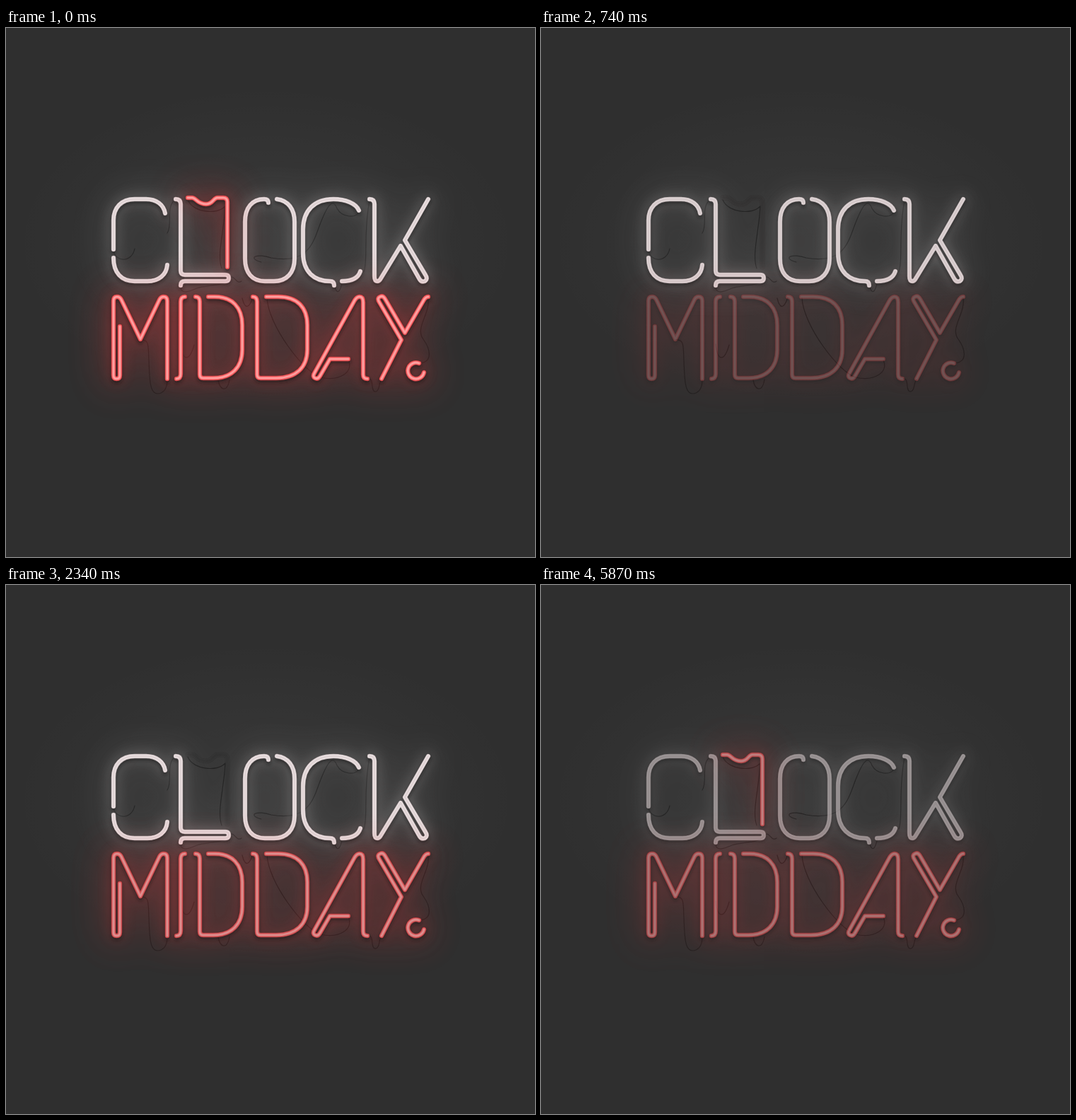
An HTML page for the animation above (5900 ms loop, 748 px wide and 748 px high).

```html
<!DOCTYPE html>
<html lang="en">
<head>
<meta charset="utf-8">
<title>Clock Midday</title>
<style>
  html, body { margin: 0; width: 100%; height: 100%; overflow: hidden; background: #2f2f2f; }
  svg { display: block; width: 100vw; height: 100vh; }
  path { fill: none; stroke-linecap: round; stroke-linejoin: round; }
</style>
</head>
<body>
<svg id="sign" viewBox="0 0 748 748" role="img" aria-label="CLOCK MIDDAY.">
  <defs>
    <radialGradient id="wall">
      <stop offset="0" stop-color="#fff" stop-opacity=".045"/>
      <stop offset=".5" stop-color="#fff" stop-opacity=".026"/>
      <stop offset="1" stop-color="#fff" stop-opacity="0"/>
    </radialGradient>
    <filter id="soft" filterUnits="userSpaceOnUse" x="0" y="0" width="748" height="748"><feGaussianBlur stdDeviation="2"/></filter>
    <filter id="near" filterUnits="userSpaceOnUse" x="0" y="0" width="748" height="748"><feGaussianBlur stdDeviation="9"/></filter>
    <filter id="far" filterUnits="userSpaceOnUse" x="0" y="0" width="748" height="748"><feGaussianBlur stdDeviation="26"/></filter>
  </defs>
  <ellipse cx="368" cy="305" rx="358" ry="225" fill="url(#wall)"/>
</svg>
<script>
const LOOP = 5900;
const sign = document.getElementById('sign');

const top5 = [
  // C
  'M225 262C223 250 213 242 198 242H182C163 242 152 254 152 272V313',
  'M152 325C152 346 163 358 182 358H200C216 358 227 349 228 335',
  // L
  'M240 242q7 0 7 7V343q0 6 6 6H310q5 0 5 4.5t-5 4.5H253q-6 0 -6 6',
  // O
  'M383 242C399 244 408 256 408 274V326C408 346 397 358 379 358H366C348 358 338 346 338 326V274C338 254 348 242 365 242q6 0 6 5',
  // C
  'M499 258C495 248 480 242 463 242C436 242 420 258 420 285V318C420 345 436 358 458 358q6 0 6 6',
  'M475 358C488 358 498 354 501 344',
  // K
  'M514 242q7 0 7 7V351q0 7 4 7q3 0 5 -4L558 308L584 354q3 6 8 4q5 -3 1 -9L564 300L597 242'
].join('');

const low6 = [
  // M
  'M161 422V491q0 5 -4.5 5t-4.5 -5V386q0 -6 5 -6q4 0 6 4L190 440L217 384q2 -4 6 -4q5 0 5 6V496',
  // I
  'M253 380q-6 0 -6 7V489q0 7 -6 7',
  // D
  'M268 380q6 0 6 7V490q0 5 5 5H293C319 495 334 480 334 455V420C334 395 320 380 295 380H286',
  // D
  'M349 380q6 0 6 7V490q0 5 5 5H382C410 495 426 480 426 455V420C426 395 412 380 385 380H368',
  // A
  'M511 496q-6 0 -6 -6V388q0 -8 -5 -8q-4 0 -7 5L436 488q-3 5 1 7q4 2 7 -3L458 468H484',
  // Y
  'M531 496L559 441L528 388q-4 -6 1 -8q4 -2 7 3L564 431L590 386q3 -6 7 -6',
  // point
  'M584 474A11.5 11.5 0 1 0 591 487'
].join('');

const tag = 'M257 240H263C269 240 270 249 283 249C293 249 293 240 299 240H307q6 0 6 6V338';

const cables = [
  'M151 313C155 332 178 332 182 312',
  'M240 243C225 250 236 280 228 290',
  'M257 243C265 262 300 264 310 252C308 290 298 320 305 340',
  'M247 364C246 378 258 373 270 368S310 365 316 355S325 364 333 358',
  'M361 331C340 325 355 318 375 325C430 335 435 300 445 275C455 250 462 240 468 255C475 268 495 270 500 259',
  'M464 364q6 20 12 -6',
  'M514 244C505 290 512 330 506 345',
  'M190 441C203 440 201 450 202 470C203 500 204 517 214 517C224 517 228 508 228 498',
  'M247 447C250 474 260 470 266 448',
  'M300 497C302 513 313 516 316 497',
  'M334 382C338 399 344 396 349 381',
  'M369 382C371 420 420 486 445 494C472 500 492 486 484 470',
  'M512 496C521 494 515 514 522 514C529 514 527 500 531 497',
  'M597 382C600 404 578 424 590 440C600 454 604 472 585 474'
].join('');

function add(parent, name, attrs) {
  const el = document.createElementNS('http://www.w3.org/2000/svg', name);
  for (const key in attrs) el.setAttribute(key, attrs[key]);
  return parent.appendChild(el);
}

function line(parent, d, stroke, width, opacity = 1, filter, dy = 0) {
  const attrs = { d, stroke, 'stroke-width': width, opacity };
  if (filter) attrs.filter = `url(#${filter})`;
  if (dy) attrs.transform = `translate(0 ${dy})`;
  return add(parent, 'path', attrs);
}

function unlit(d) {
  line(sign, d, '#000', 7, .13);
  line(sign, d, '#363636', 5.5, .9);
  line(sign, d, '#303030', 3.5, .8);
}

function glow(parent, d, c) {
  line(parent, d, c.glow, 26, c.far, 'far');
  line(parent, d, c.glow, 11, c.near, 'near');
}

function tube(parent, d, c) {
  line(parent, d, '#181414', 7, .55, 'soft', 3);
  line(parent, d, c.rim, 6.4);
  line(parent, d, c.body, 5);
  line(parent, d, c.core, 2.6);
}

function lit(d, c) {
  const g = add(sign, 'g', {});
  glow(g, d, c);
  tube(g, d, c);
  return g;
}

const white = { glow: '#efe9e9', far: .11, near: .22, rim: '#b9adae', body: '#efe5e6', core: '#dfd3d4' };
const red = { glow: '#e83a3e', far: .3, near: .2, rim: '#d23f42', body: '#f7696b', core: '#ffa0a1' };

[top5, low6, tag].forEach(unlit);
line(sign, cables, '#212121', 1.2);
const whiteTubes = lit(top5, white);
const redTubes = lit(low6, red);
const tagTube = lit(tag, red);

// Rows of [ms, brightness]; a repeated time is a hard change.
const blink = low => [[0, 1], [30, 1], [30, low], [60, low], [60, 1], [530, 1], [530, 0]];
const close = low => [[5870, 1], [5870, low], [LOOP, low]];

function play(el, rows) {
  el.animate(
    rows.map(([t, opacity]) => ({ offset: t / LOOP, opacity })),
    { duration: LOOP, iterations: Infinity }
  );
}

play(whiteTubes, [
  ...blink(.58), [560, .2], [650, .75], [740, .94], [800, 1],
  [3800, 1], [3920, .5], [4040, 1],
  ...close(.58)
]);
play(redTubes, [
  ...blink(.6), [650, 0], [740, .31], [860, .8], [950, 1],
  [2090, 1], [2230, .25], [2370, 1],
  ...close(.6)
]);
play(tagTube, [
  ...blink(.7), [740, 0], [950, 1],
  [1820, 1], [1820, 0], [2640, 0], [2640, 1],
  [3470, 1], [3470, 0], [4270, 0], [4270, 1],
  ...close(.7)
]);
</script>
</body>
</html>
```
